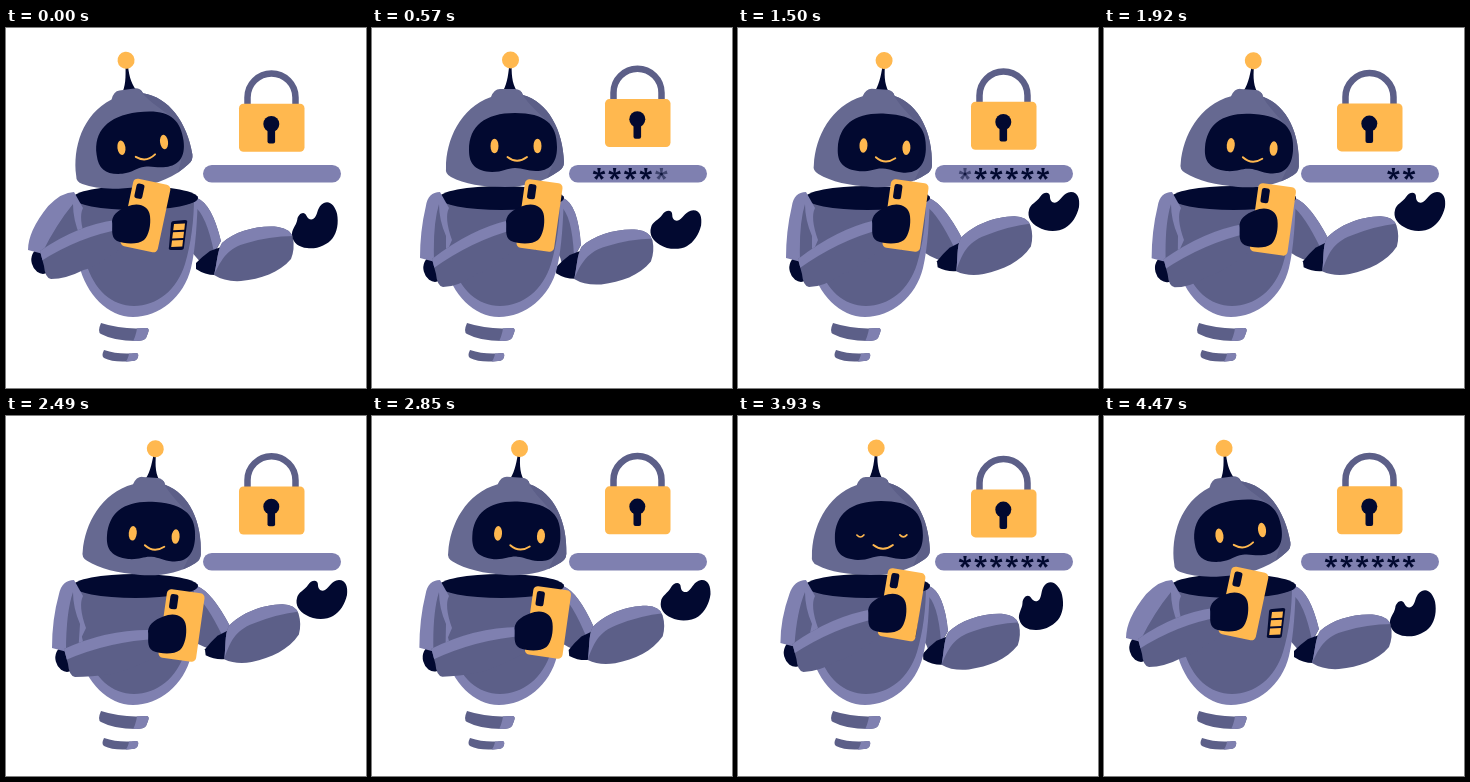
Animation, 360 px wide and 360 px high, one loop 4500 ms. Source, as an HTML page with a canvas:

```html
<!DOCTYPE html>
<html lang="en">
<head>
<meta charset="utf-8">
<title>Robot typing a password</title>
<style>
  html, body { margin: 0; width: 100%; height: 100%; overflow: hidden; background: #fff; }
  canvas { display: block; width: 100vw; height: 100vh; }
</style>
</head>
<body>
<canvas id="stage"></canvas>
<script>
const SIZE = 360, LOOP = 4500;
const NAVY = '#020930', DARK = '#5c5f88', MID = '#666991', LIGHT = '#7f80b0', ORANGE = '#ffb84f';
const canvas = document.getElementById('stage');
const ctx = canvas.getContext('2d');
const density = Math.max(1, window.devicePixelRatio || 1);
canvas.width = canvas.height = SIZE * density;

const clamp = v => Math.min(1, Math.max(0, v));
const ease = (t, from, to) => {
  const u = clamp((t - from) / (to - from));
  return u * u * (3 - 2 * u);
};

// Blends from the first pose through each later one as its move takes place.
function blend(t, first, ...moves) {
  const pose = { ...first };
  for (const [from, to, next] of moves) {
    const e = ease(t, from, to);
    for (const key in pose) pose[key] += (next[key] - pose[key]) * e;
  }
  return pose;
}

const leftArm = {
  home: { x: 36, y: 233, handX: 125, handY: 196, phoneTilt: 12 },
  typing: { x: 62, y: 241, handX: 153, handY: 196, phoneTilt: 8 },
  lowered: { x: 60, y: 243, handX: 161, handY: 218, phoneTilt: 8 },
  raised: { x: 69, y: 241, handX: 164, handY: 198, phoneTilt: 8 }
};
const rightArm = {
  home: { x: 201, y: 236, turn: 0, handX: 310, handY: 200, handTurn: -23 },
  low: { x: 195, y: 240, turn: -1, handX: 304, handY: 202, handTurn: 1 },
  offering: { x: 210, y: 233, turn: -6.5, handX: 316, handY: 184, handTurn: 0 },
  resting: { x: 196, y: 238, turn: -2.5, handX: 304, handY: 193, handTurn: -30 }
};

function fill(path, color) {
  ctx.fillStyle = color;
  ctx.fill(typeof path === 'string' ? new Path2D(path) : path);
}

function line(path, color, width) {
  ctx.strokeStyle = color;
  ctx.lineWidth = width;
  ctx.lineCap = 'round';
  ctx.stroke(new Path2D(path));
}

function oval(x, y, rx, ry, color, angle = 0) {
  const p = new Path2D();
  p.ellipse(x, y, rx, ry, angle, 0, Math.PI * 2);
  fill(p, color);
}

function box(x, y, w, h, r, color) {
  const p = new Path2D();
  p.roundRect(x, y, w, h, r);
  fill(p, color);
}

function placed(x, y, degrees, draw) {
  ctx.save();
  ctx.translate(x, y);
  ctx.rotate(degrees * Math.PI / 180);
  draw();
  ctx.restore();
}

// A shape in one color with a second tone laid inside it.
function shaded(shape, color, tone, toneColor) {
  fill(shape, color);
  ctx.save();
  ctx.clip(new Path2D(shape));
  fill(tone, toneColor);
  ctx.restore();
}

function drawSpring() {
  shaded('M95 295Q117 302 140 300Q144 300 142 305L140 310Q138 313 130 313Q108 313 95 306Q91 304 95 295Z',
    DARK, 'M131 290H150V320H123Q133 306 131 290Z', LIGHT);
  shaded('M98 322Q113 327 130 325Q133 325 132 329Q131 333 126 333Q108 335 98 330Q95 328 98 322Z',
    DARK, 'M123 318H140V338H116Q125 330 123 318Z', LIGHT);
}

function drawTorso() {
  shaded('M67 168C68 190 67 215 73 237C80 266 102 289 127 289C153 289 178 269 185 240C190 219 191 193 192 168Z',
    LIGHT, 'M75 170C72 200 74 218 80 235C88 262 106 278 128 278C151 278 171 262 179 236C185 216 188 192 188 170Z', DARK);
  oval(129.5, 170, 62.5, 12, NAVY);
  fill('M168 193L179 192Q182 192 181 195L178 219Q178 222 175 222L165 222Q162 222 163 219L165 196Q165 193 168 193Z', NAVY);
  for (let i = 0; i < 3; i++) {
    const x = 168 - i, y = 196 + i * 8.3;
    fill(`M${x} ${y}L${x + 11} ${y - 0.6}L${x + 10.3} ${y + 5.8}L${x - 0.8} ${y + 6.3}Z`, ORANGE);
  }
}

function drawRightArm({ x, y, turn, handX, handY, handTurn }) {
  const outer = `Q206 176 ${x + 14} ${y - 23}`;
  shaded(`M185 171L191 170${outer}L${x + 6} ${y - 8}L${x - 5} ${y}Q190 229 183 221Z`, DARK,
    `M191 165${outer}L${x + 7} ${y - 12}Q200 186 188 178Z`, LIGHT);
  placed(x, y, turn, () => {
    fill('M-11 -1Q-4 -8 3 -13L14 -17L8 11Q-2 11 -11 5Z', NAVY);
    shaded('M7 11C10 0 10 -13 15 -21C28 -33 52 -39 71 -37Q84 -35 86 -26Q88 -15 84 -5C72 9 54 15 34 17Q18 18 7 11Z',
      DARK, 'M6 13C14 -4 20 -16 40 -21Q62 -28 90 -28V-45H6Z', LIGHT);
  });
  placed(handX, handY, handTurn, () =>
    fill('M-25 -2C-24 -8 -17 -10 -14 -15C-11 -20 -4 -21 -4 -15C-4 -11 -1 -8 3 -10C8 -13 9 -19 17 -20C24 -20 26 -13 25 -5C23 4 18 12 11 16C4 20 -8 20 -16 15C-23 11 -27 5 -25 -2Z', NAVY));
}

function drawHead({ tilt }, eyesClosed) {
  placed(133 + tilt * 0.4, 150, tilt, () => {
    ctx.translate(-133, -150);
    fill('M129 66C135 58 136 48 137.2 38H139.6C139.6 49 140.5 58 147 66Z', NAVY);
    oval(138.5, 32, 8.5, 8.5, ORANGE);
    shaded('M74 140C74 112 88 80 119 69Q122 61 128 61H143Q149 61 151 67C176 74 191 102 192 134Q192 140 187 143C172 154 153 159 133 159C111 159 92 156 79 149Q73 146 74 140Z',
      MID, 'M146 58C151 72 164 82 176 94C188 108 187 130 170 160H200V58Z', DARK);
    fill('M97 122C97 98 113 85 143 85C173 85 185 96 185 119C185 136 177 143 164 143C155 143 151 140 143 140C135 140 131 144 120 144C104 143 97 137 97 122Z', NAVY);
    for (const x of [122.5, 165.5]) {
      if (eyesClosed) line(`M${x - 3.5} 119Q${x} 123 ${x + 3.5} 119`, ORANGE, 1.7);
      else oval(x, 118, 4, 7.3, ORANGE);
    }
    line('M135.5 129Q145 136.5 155 129', ORANGE, 1.9);
  });
}

function drawLeftArm({ x, y, handX, handY, phoneTilt }) {
  oval(x, y, 10.5, 13, NAVY, -0.25);
  shaded(`M68 164Q56 164 ${x * 0.45 + 26} 178Q${x - 14} 203 ${x - 14} ${y - 11}Q${x - 4} ${y - 8} ${x + 8} ${y - 6}L80 212Q72 190 77 180Z`,
    LIGHT, `M67 176Q${x * 0.4 + 36} 196 ${x} ${y - 8}L${x + 12} ${y - 4}L74 208Q67 192 67 176Z`, DARK);

  const startX = x + 5, startY = y - 9, endX = handX - 15, endY = handY - 4;
  const midX = (startX + endX) / 2, midY = (startY + endY) / 2;
  shaded(`M${startX - 7} ${startY - 1}Q${midX - 4} ${midY - 11} ${endX} ${endY}L${handX - 4} ${handY + 20}`
    + `Q${midX + 16} ${midY + 31} ${midX + 2} ${midY + 34}Q${x + 24} ${y + 18} ${x + 9} ${y + 18}`
    + `Q${x + 3} ${y + 17} ${x + 2} ${y + 5}Z`,
    DARK, `M${startX - 12} ${startY + 13}Q${midX - 5} ${midY + 1} ${endX + 6} ${endY + 9}V${endY - 25}H${startX - 12}Z`, LIGHT);

  placed(handX + 14.5, handY - 8.5, phoneTilt, () => {
    box(-19, -34.5, 38, 69, 4.5, ORANGE);
    box(-15, -30, 8, 15, 2.5, NAVY);
  });
  placed(handX, handY, 0, () =>
    fill('M-19 -3C-18 -11 -10 -16 1 -19C10 -21 18 -17 19 -8C20 1 18 11 13 16C7 21 -7 20 -14 17C-21 13 -18 4 -19 -3Z', NAVY));
}

function drawLock(t) {
  const swing = (1 + Math.cos(t / 1800 * Math.PI * 2)) / 2;
  placed(0, 5.5 * swing ** 1.6, 0, () => {
    line('M241.5 75V64A24 24 0 0 1 289.5 64V75', DARK, 6.5);
    box(233, 70.3, 65.5, 48, 4.5, ORANGE);
    oval(265.3, 90.5, 8, 8, NAVY);
    box(261.5, 92, 7.6, 18, 2, NAVY);
  });
}

function drawPassword(t) {
  box(197, 137, 138, 17.5, 8.75, LIGHT);
  const cycle = (t + 3120) % 3150, step = 120;
  for (let i = 0; i < 6; i++) {
    const shown = clamp(cycle / step - i);
    const hidden = clamp((cycle - 1410) / step - i);
    ctx.globalAlpha = shown * (1 - hidden);
    placed(227 + i * 15.6, 146, 0, () => {
      for (let arm = 0; arm < 5; arm++) {
        ctx.rotate(Math.PI * 2 / 5);
        fill('M-0.8 0L-1.7 -6H1.7L0.8 0Z', NAVY);
      }
      oval(0, 0, 1.6, 1.6, NAVY);
    });
  }
  ctx.globalAlpha = 1;
}

function render(t) {
  const left = blend(t, leftArm.home, [100, 500, leftArm.typing], [1800, 2250, leftArm.lowered],
    [2730, 3220, leftArm.raised], [3700, 4250, leftArm.home]);
  const right = blend(t, rightArm.home, [100, 500, rightArm.low], [950, 1400, rightArm.offering],
    [2730, 3200, rightArm.resting], [3900, 4300, rightArm.home]);
  const head = blend(t, { tilt: -7.5 }, [100, 500, { tilt: 0 }], [800, 1900, { tilt: 4.4 }],
    [2730, 3200, { tilt: 0 }], [3900, 4300, { tilt: -7.5 }]);
  const wave = Math.sin(Math.PI * clamp((t - 3330) / 470));
  right.handX += 5 * wave;
  right.handTurn += 15 * wave;

  ctx.setTransform(density, 0, 0, density, 0, 0);
  ctx.fillStyle = '#fff';
  ctx.fillRect(0, 0, SIZE, SIZE);
  drawSpring();
  drawRightArm(right);
  drawTorso();
  drawHead(head, t >= 3840 && t < 4020);
  drawLeftArm(left);
  drawLock(t);
  drawPassword(t);
}

const start = performance.now();
function tick() {
  render((performance.now() - start) % LOOP);
  requestAnimationFrame(tick);
}
tick();
</script>
</body>
</html>
```
